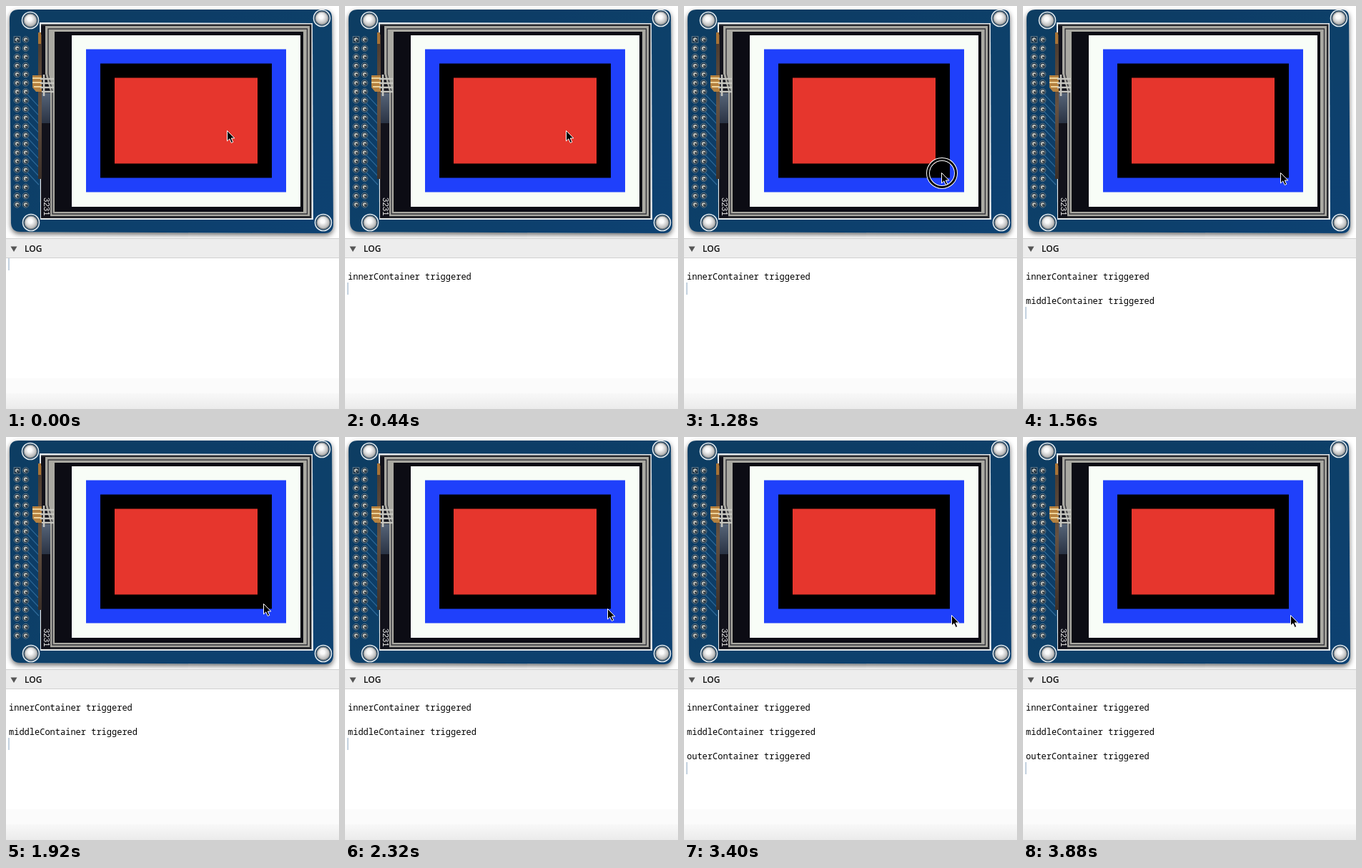
These frames come from a looping animation (466x564 px, 3920 ms). An HTML page:

```html
<!DOCTYPE html>
<html lang="en">
<head>
<meta charset="utf-8">
<title>Nested containers</title>
<style>
  html, body { margin: 0; width: 100%; height: 100%; overflow: hidden; background: #fff; }
  svg { display: block; }
  .log { font: 12px "Noto Sans Mono", monospace; fill: #000; }
  .title { font: 600 12px "Open Sans", sans-serif; fill: #111; }
  .serial { font: 11.5px "Liberation Sans", sans-serif; fill: #eee; }
</style>
</head>
<body>
<svg width="466" height="564" viewBox="0 0 466 564">
  <defs>
    <linearGradient id="pcb" x1="0" y1="0" x2="1" y2="1">
      <stop offset="0" stop-color="#0b3c62"/>
      <stop offset=".5" stop-color="#0c3f69"/>
      <stop offset="1" stop-color="#0d4272"/>
    </linearGradient>
    <linearGradient id="foot" x1="0" y1="0" x2="0" y2="1">
      <stop offset="0" stop-color="#f8f8f8"/>
      <stop offset="1" stop-color="#ebebeb"/>
    </linearGradient>
    <linearGradient id="glass" x1="0" y1="0" x2="0" y2="1">
      <stop offset="0" stop-color="#566478"/>
      <stop offset="1" stop-color="#2a3344"/>
    </linearGradient>
    <linearGradient id="flex" x1="0" y1="0" x2="0" y2="1">
      <stop offset="0" stop-color="#4a3a2e"/>
      <stop offset=".5" stop-color="#665242"/>
      <stop offset="1" stop-color="#3c3029"/>
    </linearGradient>
    <radialGradient id="hole" cx=".45" cy=".4">
      <stop offset=".3" stop-color="#fafafa"/>
      <stop offset="1" stop-color="#bdbdbd"/>
    </radialGradient>
    <filter id="shadow" x="-10%" y="-10%" width="120%" height="120%">
      <feDropShadow dx="0" dy="3" stdDeviation="3.5" flood-opacity=".6"/>
    </filter>
  </defs>

  <path d="M18 5H444Q456 4 456 16L458 305Q458 318 446 318L20 316Q8 316 7 304L5 18Q5 5 18 5Z" fill="url(#pcb)" filter="url(#shadow)"/>
  <g id="traces" fill="none" stroke="#2f6a98" stroke-width="1.2"></g>
  <g id="pins"></g>
  <g id="holes"></g>

  <!-- display module -->
  <path d="M47 23L429 24L430 299L48 299Z" fill="#e6eaed"/>
  <path d="M49 25.5H427.5V297H49Z" fill="#25262b"/>
  <path d="M55 28H425V294H62V120L55 95Z" fill="#aaa9a2"/>
  <path d="M59 32H421.5V291H65V120L59 95Z" fill="none" stroke="#34343a" stroke-width="1.4"/>
  <path d="M68 36H416V288H68Z" fill="#0c0c14"/>
  <path d="M49 28H55V95L62 120V296H49Z" fill="#12121b"/>
  <path d="M50 122H62V164H50Z" fill="url(#glass)"/>
  <path d="M45 40H50V242H45Z" fill="url(#flex)"/>
  <path d="M45 37H49V53H45Z" fill="#a87336"/>
  <path d="M37 97H50V120H42L37 114Z" fill="#b48140"/>
  <path d="M37 101H50M37 107H50M39 113H50" stroke="#efd39a" stroke-width="2"/>
  <path d="M48 102H67M48 108H67M48 114H67M50 120H67M53 96V126" fill="none" stroke="#c6c6c0" stroke-width="2.6"/>
  <text class="serial" transform="translate(52.5 268) rotate(90)">3231</text>

  <!-- nested containers -->
  <path d="M92 41H412V281H92Z" fill="#f8fdf7"/>
  <g transform="translate(0 -.5)">
    <path d="M112 61H392V261H112Z" fill="#1f40fb"/>
    <path d="M132 81H372V241H132Z"/>
    <path d="M152 101H352V221H152Z" fill="#e6362d"/>
  </g>

  <!-- log panel -->
  <path d="M0 325H466V564H0Z" fill="#fff"/>
  <path d="M0 325H466V353H0Z" fill="#ededed"/>
  <path d="M0 325.5H466M0 352.5H466" stroke="#d0d0d0"/>
  <path d="M6.5 336.5H15.5L11 344Z" fill="#555"/>
  <text class="title" x="26" y="344">LOG</text>
  <path d="M0 521H466V542H0Z" fill="#fbfbfb"/>
  <path d="M0 542H466V564H0Z" fill="url(#foot)"/>
  <g id="lines"></g>
  <path id="caret" d="M4 353V370" stroke="#b5c6d8" stroke-width="1.6"/>

  <g id="pointer">
    <g id="ring" fill="none">
      <circle cx="1" cy="1" r="19.5" stroke="#fff" stroke-width="5"/>
      <circle cx="1" cy="1" r="19.5" stroke="#000" stroke-width="3"/>
    </g>
    <path d="M.5 .5V15L3.8 11.9L6.3 17.5L8.8 16.4L6.3 11H10.8Z" stroke="#fff"/>
  </g>
</svg>
<script>
const LOOP = 3920, STEP = 40;
const $ = id => document.getElementById(id);

const pinRows = Array.from({ length: 20 }, (_, i) => 47 + i * 12.15);
$('pins').innerHTML = pinRows.map((y, i) => [15.5, 27.5].map(x => `
  <rect x="${x - 4.3}" y="${y - 4.3}" width="8.6" height="8.6" rx="${i || x > 20 ? 4.3 : 0}" fill="#0a2238" stroke="#6a8292"/>
  <circle cx="${x}" cy="${y}" r="2.8" fill="#b9bcb8"/>
  <circle cx="${x + .9}" cy="${y + .9}" r="1.4" fill="#252e35"/>`).join('')).join('');

$('traces').innerHTML = pinRows.slice(6, 16)
  .map(y => `<path d="M30 ${y + 4}l16 17"/>`).join('');

$('holes').innerHTML = [[34, 20], [442, 17], [35, 303], [444, 303]].map(([x, y]) => `
  <circle cx="${x}" cy="${y}" r="11.5" fill="#0b3559" stroke="#e2e9ed" stroke-width="1.6"/>
  <circle cx="${x}" cy="${y}" r="9" fill="url(#hole)" stroke="#85898b" stroke-width="1.4"/>`).join('');

const clicks = [
  { name: 'inner', down: 160, up: 400 },
  { name: 'middle', down: 1220, up: 1460 },
  { name: 'outer', down: 2700, up: 2940 },
];
$('lines').innerHTML = clicks.map(({ name }, i) =>
  `<text class="log" x="4" y="${383 + i * 34}">${name}Container triggered</text>`).join('');
const lines = [...$('lines').children];

const ease = (t, from, to) => {
  const p = Math.min(1, Math.max(0, (t - from) / (to - from)));
  return p * p * (3 - 2 * p);
};
const show = (el, on) => el.setAttribute('visibility', on ? 'visible' : 'hidden');

function draw(now) {
  const t = Math.floor(now % LOOP / STEP) * STEP;
  const first = ease(t, 640, 1140), second = ease(t, 2100, 2560);
  const x = Math.round(309 + 51 * first + 14 * second);
  const y = Math.round(174 + 59 * first + 16 * second);
  $('pointer').setAttribute('transform', `translate(${x} ${y})`);
  show($('ring'), clicks.some(c => t >= c.down && t < c.up));

  clicks.forEach((c, i) => show(lines[i], t >= c.up));
  const logged = clicks.filter(c => t >= c.up).length;
  $('caret').setAttribute('transform', `translate(0 ${logged * 34})`);
  requestAnimationFrame(draw);
}
draw(performance.now());
</script>
</body>
</html>
```
